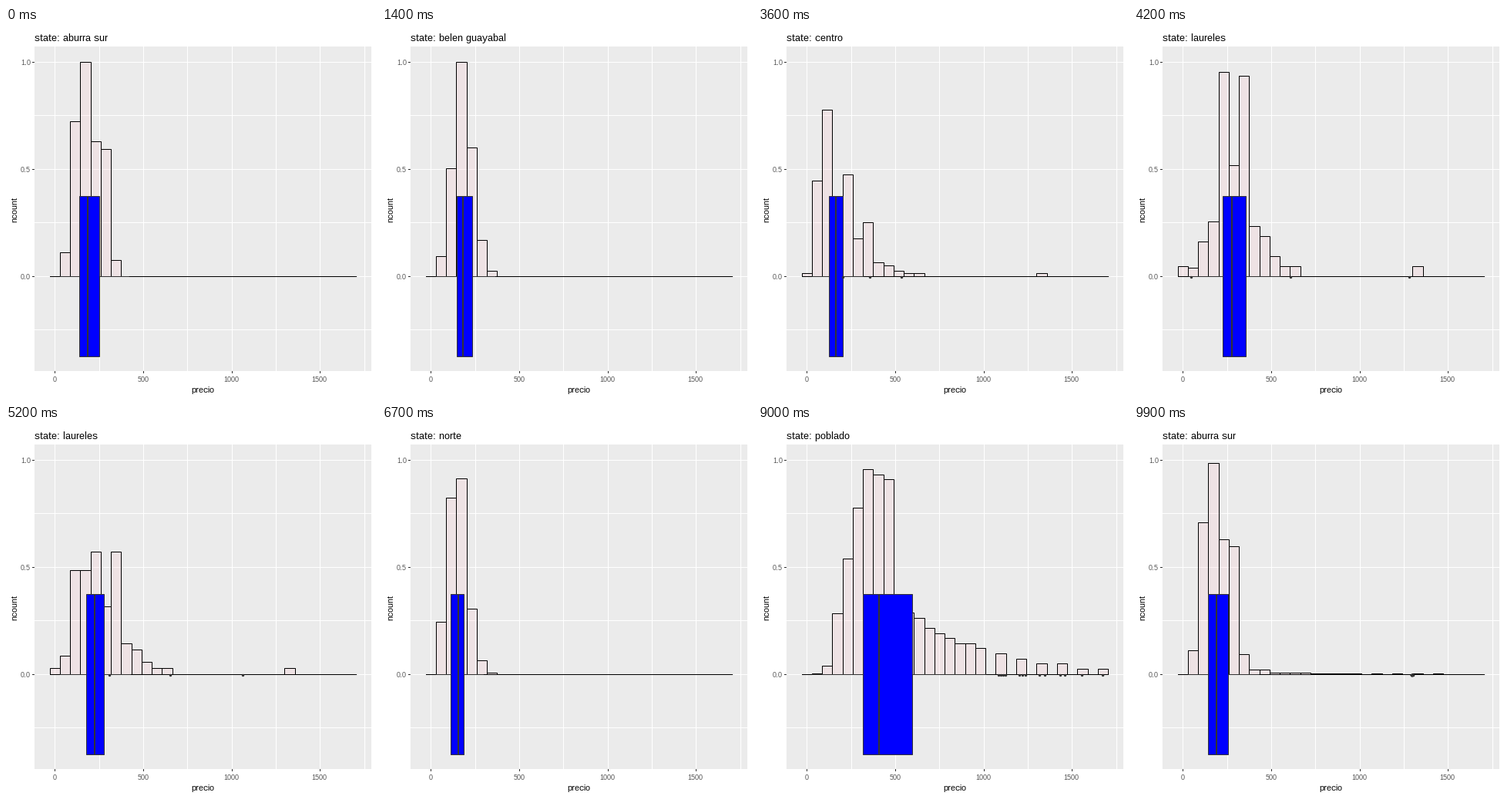
Animation, 480 px wide and 480 px high, one loop 10000 ms. Source, as a matplotlib script:

```python
import math

import matplotlib.pyplot as plt
import numpy as np
from matplotlib.animation import FuncAnimation
from matplotlib.patches import Rectangle

SIZE, DPI = 480, 72
FRAMES, STEP = 100, 100
BINS = 30
ZERO, UNIT = 322, 278          # pixel row of 0 and pixels per 1.0
STILL = 3                      # still frames per state
DARK, GREY = "#333333", "#4D4D4D"
K = np.arange(BINS)

plt.rcParams.update({
    "font.family": "Liberation Sans",
    "path.snap": False,
    "text.hinting": "native",
    "text.hinting_factor": 1,
})


def px(v):
    return math.floor(v + 0.5)


def edge(k):
    return px(56.72 + 13.245 * k)


def points(first, *heights):
    """A few neighbouring bars starting at bin `first`."""
    h = np.zeros(BINS)
    h[first:first + len(heights)] = heights
    return h


def bell(peak, left, right):
    """Lopsided bell, empty below the first price class."""
    d = np.abs(K - peak) / np.where(K < peak, left, right)
    h = np.exp(-d ** 1.8)
    return np.where((K > 0) & (h > 0.01), h, 0)


def long_tail(total=41):
    """Steep rise, flat crest, then a decay that gets patchy."""
    crest = np.clip(np.minimum(0.25 * (K - 1.9), 1.15 - 0.0275 * K), 0, 1)
    tail = 12 * 0.88 ** (K - 10.0)
    tail[(K > 17) & (K % 2 == 0)] = 0
    return np.round(np.where(K < 9, crest * total, tail)) / total


def tail_dots(h, first, total=41):
    """One point per count, spread evenly over its bin."""
    dots = []
    for k in range(first, BINS):
        n = round(h[k] * total)
        dots += [edge(k) + 13.2 * (j + 0.5) / n for j in range(n)]
    return dots


# name, bar heights, quartiles (px), outliers (px)
dear = long_tail()
STATES = [
    ("aburra sur", points(1, 0.111, 0.722, 1, 0.63, 0.593, 0.074),
     (95.5, 106.4, 121.2), []),
    ("belen guayabal", bell(3, 1.23, 1.45), (97, 105, 117), []),
    ("centro", points(1, 0.594, 1, 0.293, 0.297, 0.048),
     (83.8, 92, 97.2), [122.7]),
    ("laureles",
     points(0, 0.05, 0, 0.1, 0.25, 1, 0.55, 1, 0.25, 0.2, 0.1, 0.05, 0.05)
     + points(23, 0.05),
     (117.8, 129.5, 149), [69.4, 207.7, 372.7]),
    ("norte", points(1, 0.2, 1, 0.8), (86.8, 94.6, 98.9), []),
    ("occidente", bell(3, 1.74, 1.3), (91.6, 101.5, 112.2), []),
    ("poblado", dear, (137.3, 158, 202), tail_dots(dear, 18)),
]
MOVE = [12] * 3 + [11] * 4                              # transition lengths
LEAVE = np.cumsum([STILL - 1] + [m + STILL for m in MOVE[:-1]])


def mix(a, b, p):
    return (1 - p) * np.asarray(a, float) + p * np.asarray(b, float)


def mix_dots(a, b, p):
    """An empty set collapses to the other's mean; a short one repeats."""
    if not a and not b:
        return []
    n = max(len(a), len(b))
    a, b = a or [np.mean(b)], b or [np.mean(a)]
    return mix(np.resize(a, n), np.resize(b, n), p)


def pose(i):
    s = next(s for s in range(len(MOVE)) if i < LEAVE[s] + MOVE[s])
    n = max(0, i - LEAVE[s])
    p = (1 - math.cos(math.pi * n / MOVE[s])) / 2
    now, nxt = STATES[s], STATES[(s + 1) % len(STATES)]
    name = now[0] if n <= 6 else nxt[0]
    dots = mix_dots(now[3], nxt[3], p) if n else now[3]
    return name, mix(now[1], nxt[1], p), mix(now[2], nxt[2], p), dots


fig = plt.figure(figsize=(SIZE / DPI, SIZE / DPI), dpi=DPI, facecolor="white")
ax = fig.add_axes([0, 0, 1, 1])
ax.set_xlim(0, SIZE)
ax.set_ylim(SIZE, 0)
ax.axis("off")


def line(xs, ys, color, lw=1, z=1):
    return ax.plot(xs, ys, color=color, lw=lw, zorder=z,
                   solid_capstyle="butt")[0]


def label(x, y, s, size, color="black", ha="center", **kw):
    return ax.text(x, y, s, fontsize=size, color=color, ha=ha,
                   va=kw.pop("va", "baseline"), **kw)


# panel, grid, ticks and labels
L, R, T, B = 37, 474, 24, 445
ax.add_patch(Rectangle((L, T), R - L, B - T, fc="#EBEBEB", ec="none", zorder=0))
for n in range(8):
    x = px(63.12 + 57.39 * n) + 0.5
    line([x, x], [T, B], "white")
    if n % 2 == 0:
        line([x, x], [B, B + 3], DARK)
        label(x - 0.7, 459, str(n * 250), 9, GREY)
for n in range(-1, 5):
    y = math.floor(ZERO - n * UNIT / 4) + 0.5
    line([L, R], [y, y], "white")
    if n % 2 == 0:
        line([L - 3, L], [y, y], DARK)
        label(32, y + 3.5, f"{n / 4:.1f}", 9, GREY, ha="right")
label(255, 473, "precio", 11)
label(16, 235.5, "ncount", 11, rotation=90, ha="right", va="center")
title = label(L, 17, "", 13, ha="left")

# moving parts
bars = []
for k in range(BINS):
    r = Rectangle((edge(k) + 0.5, ZERO + 0.5), edge(k + 1) - edge(k), 0,
                  fc=(1, 0.753, 0.796, 0.2), ec="black", lw=1, zorder=2)
    bars.append(ax.add_patch(r))
line([edge(0), edge(BINS) + 1], [ZERO + 0.5] * 2, "black", z=3)

BOX_TOP, BOX_END = 218, 426
whisker = line([], [], DARK, z=4)
box = ax.add_patch(Rectangle((0, BOX_TOP + 0.5), 1, BOX_END - BOX_TOP,
                             fc="blue", ec=DARK, lw=1, zorder=5))
median = line([], [], DARK, lw=2, z=6)
dots = ax.scatter([], [], s=3.4 ** 2, color=DARK, linewidths=0, zorder=7)


def update(i):
    name, heights, (q1, mid, q3), xs = pose(i)
    title.set_text("state: " + name)
    for r, h in zip(bars, heights):
        top = math.floor(ZERO + 0.2 - UNIT * h)
        r.set_y(top + 0.5)
        r.set_height(ZERO - top)
        r.set_visible(top < ZERO)
    left, right = math.floor(q1), math.floor(q3)
    box.set_x(left + 0.5)
    box.set_width(right - left)
    median.set_data([px(mid)] * 2, [BOX_TOP, BOX_END + 1])
    reach = 1.5 * (q3 - q1)
    whisker.set_data([max(q1 - reach, edge(1)), q3 + reach], [ZERO + 0.5] * 2)
    dots.set_offsets([(px(x) + 0.5, ZERO + 0.5) for x in xs]
                     or np.empty((0, 2)))
    return [title, *bars, whisker, box, median, dots]


anim = FuncAnimation(fig, update, frames=FRAMES, interval=STEP,
                     init_func=lambda: update(0), repeat=True,
                     repeat_delay=0, blit=False)
plt.show()
```
